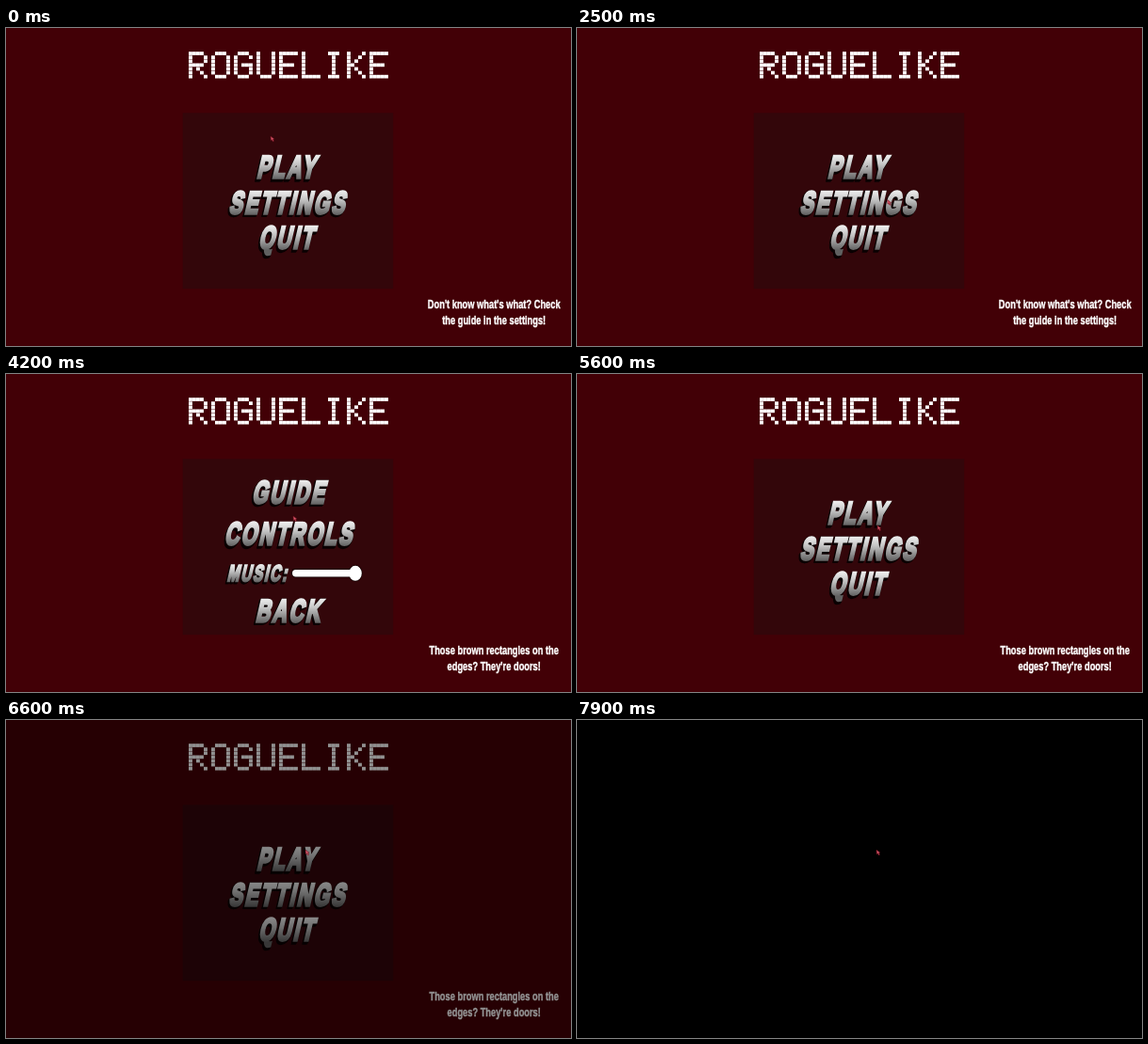
Animation of 600x338 px, one loop 8 s. Source, as an HTML page with a canvas:

```html
<!DOCTYPE html>
<html lang="en">
<head>
<meta charset="utf-8">
<title>Roguelike menu</title>
<style>
  html, body { margin: 0; width: 100%; height: 100%; overflow: hidden; background: #000; }
  canvas { display: block; width: 600px; height: 338px; }
</style>
</head>
<body>
<canvas id="stage" width="600" height="338" role="img" aria-label="Roguelike menu"></canvas>
<script>
const ctx = document.getElementById('stage').getContext('2d');
const LOOP = 8000, STEP = 100;
const FONT = '"Liberation Sans", Arial, sans-serif';

const GLYPHS = {
  R: '####. #...# #...# ####. #.#.. #..#. #...#',
  O: '.###. #...# #...# #...# #...# #...# .###.',
  G: '.###. #...# #.... #.### #...# #...# .###.',
  U: '#...# #...# #...# #...# #...# #...# .###.',
  E: '##### #.... #.... ####. #.... #.... #####',
  L: '#.... #.... #.... #.... #.... #.... #####',
  I: '.###. ..#.. ..#.. ..#.. ..#.. ..#.. .###.',
  K: '#...# #..#. #.#.. ##... #.#.. #..#. #...#'
};

const HINTS = [
  ["Don't know what's what? Check", 'the guide in the settings!'],
  ['Those brown rectangles on the', "edges? They're doors!"]
];

// Cursor waypoints: time, x, y
const PATH = [
  [0, 281, 115], [200, 281, 115], [700, 300, 190], [1100, 293, 254],
  [1400, 461, 88], [1500, 459, 84], [1600, 459, 84], [2300, 380, 190],
  [2600, 312, 180], [3000, 305, 151], [4400, 305, 151], [4900, 300, 250],
  [5100, 300, 250], [5600, 319, 161], [6200, 318, 138], [LOOP, 318, 138]
];

function cursorAt(t) {
  const i = Math.max(1, PATH.findIndex(p => p[0] > t));
  const [t0, x0, y0] = PATH[i - 1], [t1, x1, y1] = PATH[i];
  const k = (t - t0) / (t1 - t0), e = k * k * (3 - 2 * k);
  return [x0 + (x1 - x0) * e, y0 + (y1 - y0) * e];
}

function drawTitle(word) {
  const cell = 4;
  ctx.fillStyle = '#fff';
  [...word].forEach((letter, n) => {
    GLYPHS[letter].split(' ').forEach((row, r) => {
      [...row].forEach((dot, c) => {
        if (dot === '#') ctx.fillRect(194 + (n * 6 + c) * cell, 25.2 + r * 4.1, 3.9, 3.7);
      });
    });
  });
}

// Slanted comic lettering with a dark extruded edge and a metallic face
function drawLabel(text, x, y, size = 33) {
  ctx.save();
  ctx.font = `bold ${size}px ${FONT}`;
  ctx.letterSpacing = size * 0.12 + 'px';
  ctx.textAlign = 'center';
  ctx.miterLimit = 3;
  const face = ctx.createLinearGradient(0, -size * 0.76, 0, 2);
  face.addColorStop(0, '#f4f4f4');
  face.addColorStop(0.4, '#c4c4c4');
  face.addColorStop(1, '#606060');
  const layer = (dx, dy, color, width) => {
    ctx.setTransform(0.635, 0, -0.23, 1, x + dx, y + dy);
    ctx.fillStyle = ctx.strokeStyle = color;
    ctx.lineWidth = width;
    ctx.strokeText(text, 0, 0);
    ctx.fillText(text, 0, 0);
  };
  for (let d = 2.5; d > 0; d -= 0.5) layer(-d * 0.7, d, '#0b0203', size * 0.11);
  layer(0, 0, face, size * 0.1);
  ctx.restore();
}

function drawMainMenu() {
  drawLabel('PLAY', 298, 159.3);
  drawLabel('SETTINGS', 299, 196.8);
  drawLabel('QUIT', 298, 234.3);
}

function drawSettings() {
  drawLabel('GUIDE', 300.5, 136.8);
  drawLabel('CONTROLS', 300.5, 181.3);
  drawLabel('MUSIC:', 267, 219.5, 24);
  drawLabel('BACK', 300, 262.8);
  ctx.beginPath();
  ctx.roundRect(304, 208, 70, 7.5, 3.7);
  ctx.ellipse(371, 211.8, 6.8, 8, 0, 0, Math.PI * 2);
  ctx.strokeStyle = '#120304';
  ctx.lineWidth = 1.4;
  ctx.stroke();
  ctx.fillStyle = '#fff';
  ctx.fill();
}

function drawHint(lines) {
  ctx.save();
  ctx.font = `bold 13.2px ${FONT}`;
  ctx.textAlign = 'center';
  ctx.fillStyle = ctx.strokeStyle = '#fff';
  ctx.lineWidth = 0.45;
  ctx.translate(518.2, 0);
  ctx.scale(0.705, 1);
  lines.forEach((line, i) => {
    ctx.fillText(line, 0, 297.7 + i * 17);
    ctx.strokeText(line, 0, 297.7 + i * 17);
  });
  ctx.restore();
}

function drawCursor(x, y) {
  ctx.save();
  ctx.translate(x, y);
  ctx.beginPath();
  [[0, 0], [3.8, 3], [2.6, 3.3], [3.4, 5.2], [2.3, 5.6], [1.5, 3.8], [0.4, 4.5]]
    .forEach(p => ctx.lineTo(...p));
  ctx.closePath();
  ctx.strokeStyle = '#6a0d1a';
  ctx.lineWidth = 0.6;
  ctx.fillStyle = '#dc5a6c';
  ctx.fill();
  ctx.stroke();
  ctx.restore();
}

function draw(t) {
  ctx.fillStyle = '#420006';
  ctx.fillRect(0, 0, 600, 338);
  ctx.fillStyle = '#33060a';
  ctx.fillRect(187.7, 90.2, 223.5, 187);
  drawTitle('ROGUELIKE');
  if (t >= 3800 && t < 5100) drawSettings();
  else drawMainMenu();
  drawHint(HINTS[t < 4200 ? 0 : 1]);

  const fade = Math.min(1, Math.max(0, (t - 6220) / 880));
  ctx.fillStyle = `rgba(0, 0, 0, ${fade})`;
  ctx.fillRect(0, 0, 600, 338);
  drawCursor(...cursorAt(t));
}

function tick() {
  draw(Math.floor(performance.now() % LOOP / STEP) * STEP);
  requestAnimationFrame(tick);
}
tick();
</script>
</body>
</html>
```
